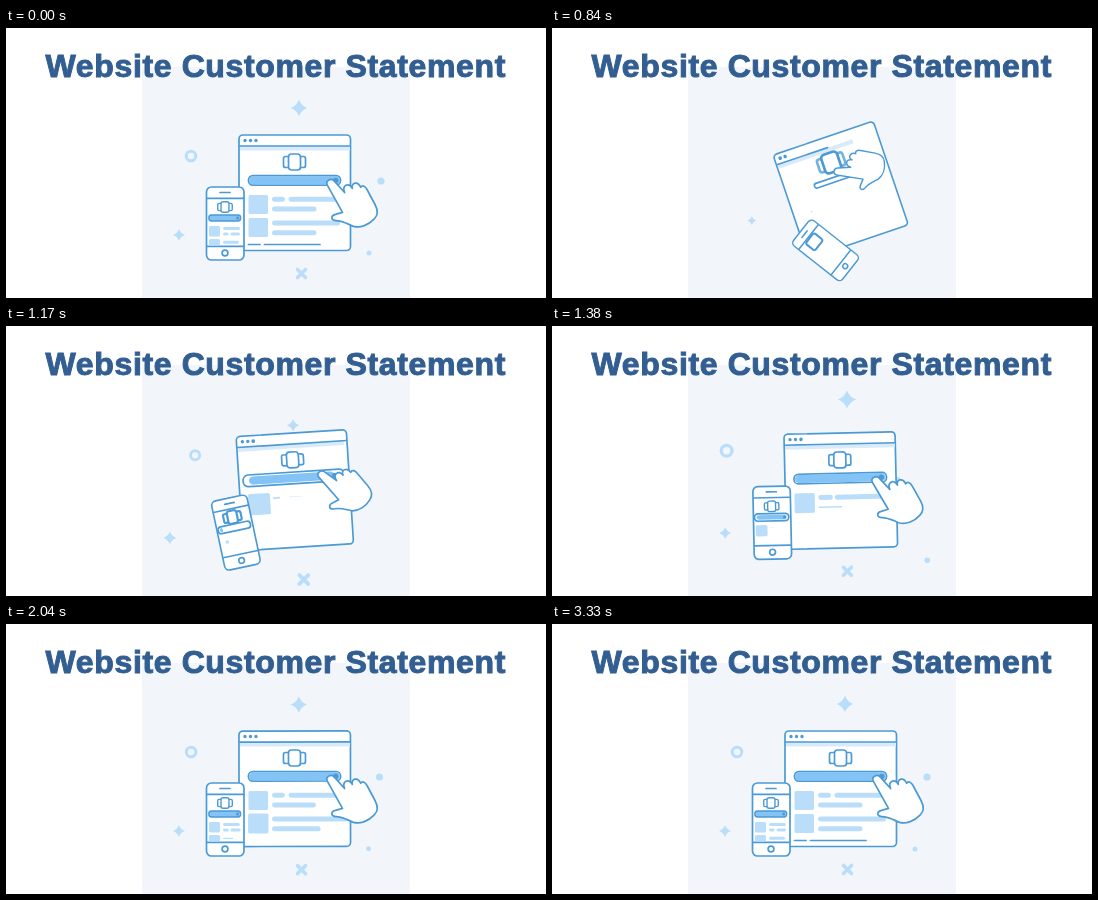
These frames come from a looping animation (540x270 px, 3510 ms). An HTML page:

```html
<!DOCTYPE html>
<html lang="en">
<head>
<meta charset="utf-8">
<title>Website Customer Statement</title>
<style>
  html, body { margin: 0; width: 100%; height: 100%; overflow: hidden; background: #fff; }
  svg { display: block; width: 100vw; height: 100vh; }
  .title { font: bold 32px "Liberation Sans", Arial, sans-serif; letter-spacing: .63px; fill: #325e91; stroke: #325e91; stroke-width: 1; }
  .line { fill: none; stroke: #4b9ad5; stroke-width: 1.7; stroke-linecap: round; stroke-linejoin: round; }
  .body { fill: #fff; }
  .bar { fill: #83c3f5; }
  .dark { fill: #4b9ad5; }
  .soft { fill: #badefa; }
  .pale { fill: #d9ebfa; }
</style>
</head>
<body>
<svg viewBox="0 0 540 270">
  <rect x="136" y="39" width="268" height="231" fill="#f2f6fb"/>
  <text class="title" x="39.6" y="48.8">Website Customer Statement</text>
  <g id="art"></g>
</svg>
<script>
const LOOP = 3510, STEP = 30;
const art = document.getElementById('art');
let now = 0;

// Damped spring from 0 to 1, starting at a given time
function spring(start, damp = 5, freq = 7) {
  const s = (now - start) / 1000;
  return s <= 0 ? 0 : 1 - Math.exp(-damp * s) * Math.cos(freq * s);
}
const capped = (...args) => Math.min(1, spring(...args));

// Exponential decay whose exponent is interpolated between keys
function decay(keys) {
  if (now <= keys[0][0]) return 1;
  let i = 1;
  while (i < keys.length - 1 && now > keys[i][0]) i++;
  const [t0, a] = keys[i - 1], [t1, b] = keys[i];
  return Math.exp(-(a + (b - a) * (now - t0) / (t1 - t0)));
}

const group = (transform, content) => `<g transform="${transform}">${content}</g>`;

// Scales and turns content about a pivot
const turn = (x, y, angle, scale, content, dx = 0, dy = 0) =>
  scale <= 0.01 ? '' : group(`translate(${x + dx} ${y + dy}) rotate(${angle}) scale(${scale}) translate(${-x} ${-y})`, content);

const box = (x, y, w, h, r, cls, extra = '') =>
  w <= 0 || h <= 0 ? '' : `<rect x="${x}" y="${y}" width="${w}" height="${h}" rx="${r}" class="${cls}" ${extra}/>`;
const dot = (x, y, r, cls) => r > 0 ? `<circle cx="${x}" cy="${y}" r="${r}" class="${cls}"/>` : '';
const path = (d, cls, extra = '') => `<path d="${d}" class="${cls}" ${extra}/>`;

// Rule that grows from its left end
function rule(x, y, w, h, start) {
  const k = spring(start), thick = h * Math.min(1, k * k);
  return box(x, y - thick / 2, w * k, thick, thick / 2, 'soft');
}
// Tile that pops up from its centre
function tile(x, y, w, h, start) {
  const k = spring(start);
  return box(x + w * (1 - k) / 2, y + h * (1 - k) / 2, w * k, h * k, 1.5 * k, 'soft');
}
function stroke(x, y, w, k) {
  return k > 0 ? path(`M${x} ${y}h${w * k}`, 'line') : '';
}

// Starts as one large frame, then opens its wings and settles
function carousel(x, y, size, start, settle) {
  const open = capped(start), w = 19 - 7 * open;
  const scale = size * (1.3 - .3 * capped(settle));
  const weight = `style="stroke-width:${1.7 / Math.sqrt(size) * (1.3 - .3 * capped(settle))}"`;
  const wing = side => path(`M${6 * side} -5.5h${3 * side}q${2 * side} 0 ${2 * side} 2v7q0 2 ${-2 * side} 2h${-3 * side}`,
    'line', `opacity="${open}" ${weight}`);
  return group(`translate(${x} ${y}) scale(${scale})`,
    wing(-1) + wing(1) + box(-w / 2, -8, w, 16, 3, 'line body', weight));
}

function searchBar(x, y, w, h, start, fillStart) {
  const k = spring(start), f = capped(fillStart);
  const loose = Math.max(0, k - 1) * 20;
  const ow = w * k, oh = h * Math.min(1, k) + loose;
  return box(x + (w - ow) / 2, y - oh / 2, ow, oh, oh / 2.2, 'line body')
    + box(x + .6, y - h / 2 + .6, (w - 1.2) * f, h - 1.2, h / 2.2, 'bar')
    + dot(x + w - h / 2, y, h * .28 * f, 'dark');
}

function browser() {
  const d = now < 240 ? 1 : Math.exp(-(now - 240) / 203);
  const parts = box(233, 107, 111.5, 115.5, 4, 'line body')
    + box(234, 118, 110 * capped(535, 4, 2), 4.5, 0, 'pale')
    + stroke(233.5, 118, 110.5, capped(745))
    + [500, 560, 850].map((s, i) => dot(239 + i * 5.5, 112.5, 1.7 * spring(s), 'dark')).join('')
    + (now > 420 ? carousel(288.5, 134, 1, 690, 830) : '')
    + searchBar(242.5, 152.3, 92, 9.5, 740, 965)
    + tile(242.5, 167, 19.5, 19, 825)
    + rule(266, 171.3, 13, 5, 1060) + rule(282.5, 171.3, 51.5, 5, 1120)
    + rule(266, 181, 44.5, 5, 1280)
    + tile(242.5, 190, 19.5, 19, 1485)
    + rule(266, 195, 68, 5, 1605) + rule(266, 204.7, 44.5, 5, 1760)
    + stroke(242.5, 216.5, 11.5, capped(2080)) + stroke(258.5, 216.5, 55.5, capped(2200));
  return turn(280.5, 162, -360 * d, 1 - d, parts);
}

// Shared size curve of phone and hand; the spin differs in how it sets off
const sizeKeys = [[480, 0], [600, .54], [840, 1.94], [1170, 3.4], [1500, 7]];
const spinKeys = first => [[480, 0], [600, first], [840, 1.94], [1170, 3.4], [1500, 7]];

function phone() {
  const d = decay(sizeKeys);
  const parts = box(200.5, 159, 37.5, 73, 5, 'line body')
    + stroke(214, 164.5, 10, 1)
    + stroke(201, 170.3, 36.5, capped(540)) + stroke(201, 218.3, 36.5, capped(540))
    + `<circle cx="219" cy="225" r="2.9" class="line"/>`
    + (now > 700 ? carousel(219, 179, .66, 830, 1150) : '')
    + searchBar(203, 190, 31.5, 5.6, 900, 1150)
    + tile(203, 198, 11, 10.5, 1115)
    + rule(217, 200.5, 17, 3, 1330)
    + rule(217, 206, 5.5, 3, 1490) + rule(224.5, 206, 9.5, 3, 1520)
    + tile(203, 211, 11, 6.5, 1800)
    + rule(217, 214.3, 16, 3, 1920);
  return turn(284, 160, -360 * decay(spinKeys(.33)), 1 - d, parts);
}

function hand() {
  const d = decay(sizeKeys), drift = d * d * (1 - d);
  const shape = 'M321.3 157.2C319 152.5 325.6 149.3 328.6 153.4L338.6 164.5'
    + 'C335.6 158 342.6 153.2 346.3 160.4C344.8 154.5 352 152.8 354.6 159.3'
    + 'C356.5 156.3 359.5 158.5 361 161.5L369 176.5C372 182 371.8 187.6 368 191.2'
    + 'C362.5 197 354.5 200.2 347.5 198.4C341.5 196 336.5 192.4 329.5 192.6'
    + 'C324.3 191.8 325 187.3 329.5 186.4L336.5 184.4Z';
  return turn(282, 190, -360 * decay(spinKeys(.42)), 1 - d, path(shape, 'line body'), 220 * drift, 42 * drift);
}

// Small shapes thrown outward from the panel's centre
function bit(x, y, start, shape, damp, freq) {
  const k = spring(start, damp, freq);
  if (k <= 0) return '';
  return group(`translate(${270 + (x - 270) * k} ${155 + (y - 155) * k}) scale(${k})`, shape);
}
const sparkle = r => path(`M0 ${-r}Q${r * .25} ${-r * .25} ${r} 0Q${r * .25} ${r * .25} 0 ${r}`
  + `Q${-r * .25} ${r * .25} ${-r} 0Q${-r * .25} ${-r * .25} 0 ${-r}Z`, 'soft');

function bits() {
  return bit(293, 80, 975, sparkle(8.5), 4, 5)
    + bit(185, 128, 965, '<circle r="4.8" fill="none" stroke="#badefa" stroke-width="3"/>')
    + bit(173, 207, 700, sparkle(6))
    + bit(295.5, 245.5, 690, path('M-4 -4L4 4M4 -4L-4 4', '', 'stroke="#badefa" stroke-width="3.6" stroke-linecap="round"'))
    + bit(375, 153, 1240, dot(0, 0, 3.6, 'soft'))
    + bit(363, 225, 1040, dot(0, 0, 2.5, 'soft'));
}

function draw(ms) {
  now = Math.floor(ms % LOOP / STEP) * STEP;
  if (now === 0) now = LOOP;
  art.innerHTML = now < 240 ? '' : bits() + browser() + phone() + hand();
}

const begin = performance.now();
function tick() {
  draw(performance.now() - begin);
  requestAnimationFrame(tick);
}
tick();
</script>
</body>
</html>
```
